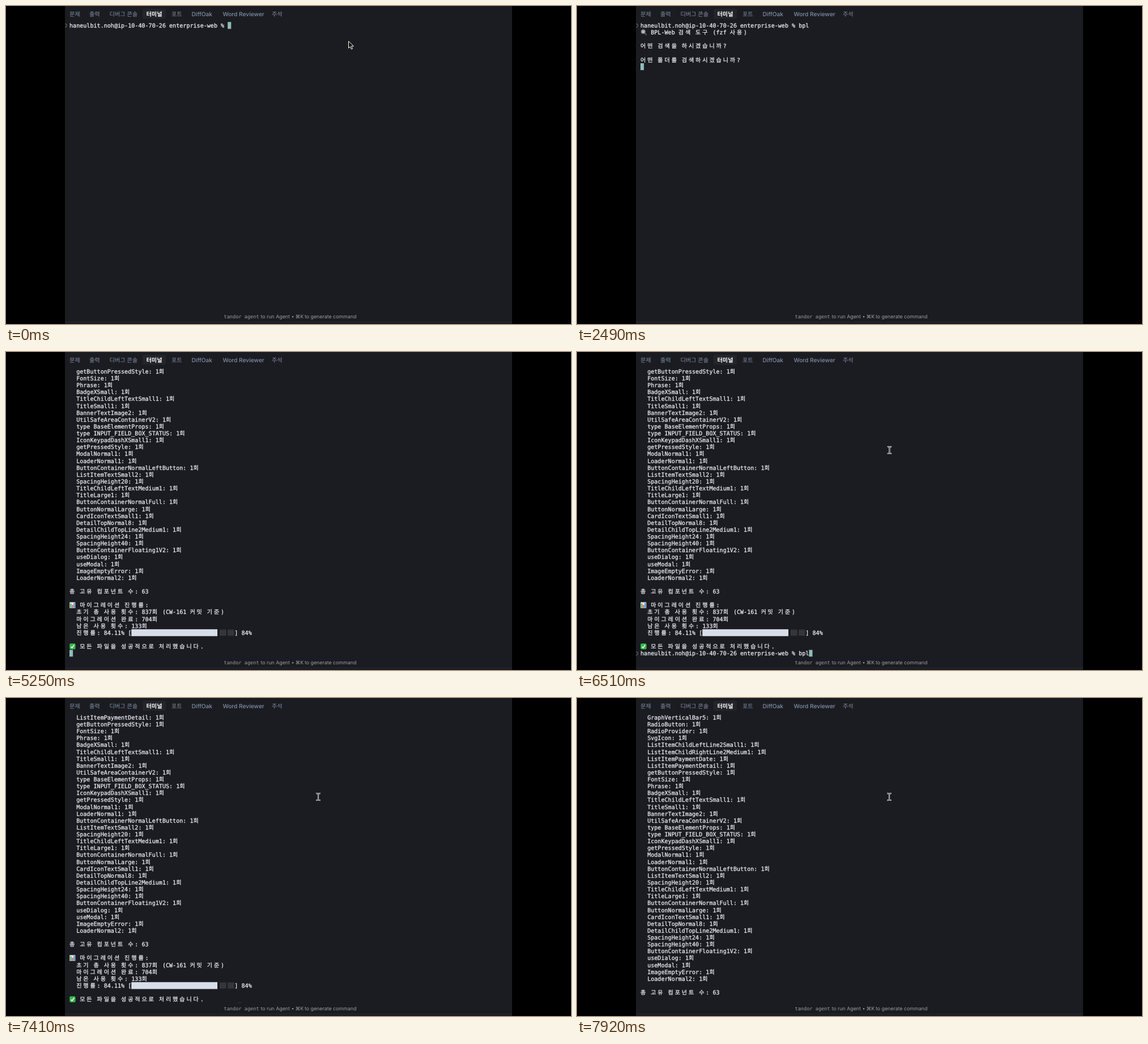
Recreate the animation shown at these times as an HTML page. Size 997x561 px, loop 8000 ms.

```html
<!DOCTYPE html>
<html lang="ko">
<head>
<meta charset="utf-8">
<title>터미널</title>
<style>
  html, body { margin: 0; width: 100%; height: 100%; overflow: hidden; background: #000; }
  svg { display: block; width: 997px; height: 561px; }
  text { white-space: pre; text-rendering: geometricPrecision; }
  .term text {
    font: 10.08px "DejaVu Sans Mono", "Noto Sans CJK KR", "Noto Sans CJK JP", monospace;
    color: #eef0f4; fill: currentColor; stroke: currentColor; stroke-width: .25px;
  }
  .tabs text { font: 500 10.2px Inter, "Noto Sans CJK KR", "Noto Sans CJK JP", sans-serif; fill: #8190a8; }
  .tabs .active { fill: #fff; font-weight: 600; }
  .hint text { font: 8.8px Inter, "DejaVu Sans", sans-serif; fill: #9b9ea4; }
  .hint .mono { font: 8.6px "DejaVu Sans Mono", monospace; }
</style>
</head>
<body>
<svg viewBox="0 0 997 561">
  <defs>
    <clipPath id="view"><rect x="104" y="28" width="789" height="509.5"/></clipPath>
    <pattern id="shade" width="3" height="3" patternUnits="userSpaceOnUse">
      <path d="M0 0h1v1h-1zM1.5 1.5h1v1h-1z" fill="#8b9099"/>
    </pattern>
  </defs>
  <rect width="997" height="561"/>
  <rect x="104" width="789" height="561" fill="#1b1c21"/>
  <rect x="104" y="557" width="789" height="1" fill="#292a30"/>
  <g class="tabs">
    <rect x="241" y="5" width="41" height="17.5" rx="3" fill="#24252b"/>
    <text x="112" y="17.6">문제</text>
    <text x="147" y="17.6">출력</text>
    <text x="182.5" y="17.6">디버그 콘솔</text>
    <text x="247.5" y="17.6" class="active">터미널</text>
    <text x="292" y="17.6">포트</text>
    <text x="327.5" y="17.6">DiffOak</text>
    <text x="382.5" y="17.6">Word Reviewer</text>
    <text x="469" y="17.6">주석</text>
  </g>
  <g class="term" clip-path="url(#view)"><g id="screen"></g></g>
  <g class="hint">
    <text x="384.5" y="551" class="mono">tandor agent</text>
    <text x="449.5" y="551">to run Agent</text>
    <circle cx="506" cy="548.2" r="1.2" fill="#9b9ea4"/>
    <text x="510.5" y="551">⌘K</text>
    <text x="527" y="551">to generate command</text>
  </g>
  <g id="pointers"></g>
</svg>
<script>
const LOOP = 8000, LEFT = 112, TOP = 28.2, CW = 6.07, RH = 12.13;
const screen = document.getElementById('screen');
const pointers = document.getElementById('pointers');
const colX = c => LEFT + c * CW;
const rowY = r => TOP + r * RH;

const icons = {
  '🔍': `<path d="M7 7l3.2 3.4" stroke="#55585f" stroke-width="2" stroke-linecap="round"/>
    <circle cx="4.8" cy="4.9" r="3.5" fill="#a9b6bd" stroke="#70757c" stroke-width="1.2"/>`,
  '📊': `<rect x=".3" y=".8" width="10" height="10.4" fill="#e9edf0"/>
    <path d="M1.3 3h2.2v8h-2.2z" fill="#4caf50"/><path d="M4.3 5.5h2.2v5.5h-2.2z" fill="#e2574c"/>
    <path d="M7.3 1.8h2.2v9.2h-2.2z" fill="#3f86d8"/>`,
  '✅': `<rect x=".2" y=".8" width="10.4" height="10.4" rx="2" fill="#33b84a"/>
    <path d="M2.6 6.4l2 2.3 3.6-5.4" fill="none" stroke="#fff" stroke-width="1.5"/>`
};
const isWide = ch => icons[ch] || /[가-힣]/.test(ch);
const cols = s => [...s].reduce((n, ch) => n + (isWide(ch) ? 2 : 1), 0);

// Sets a string on the terminal grid; Hangul and icons take two cells.
function line(s, row, col = 0, color = '') {
  const xs = [];
  let text = '', extra = '';
  for (const ch of s) {
    xs.push(colX(col).toFixed(2));
    if (icons[ch]) extra += `<g transform="translate(${colX(col)} ${rowY(row)})">${icons[ch]}</g>`;
    text += icons[ch] ? ' ' : ch === '<' ? '&lt;' : ch;
    col += isWide(ch) ? 2 : 1;
  }
  const style = color && ` style="color:${color}"`;
  return `<text x="${xs.join(' ')}" y="${(rowY(row) + 9.7).toFixed(2)}"${style}>${text}</text>${extra}`;
}
const block = (row, c, n, fill) =>
  `<rect x="${colX(c)}" y="${rowY(row)}" width="${n * CW}" height="${RH}" fill="${fill}"/>`;

const PROMPT = 'haneulbit.noh@ip-10-40-70-26 enterprise-web % ';
const prompt = row => line(PROMPT, row) +
  `<circle cx="104.6" cy="${rowY(row) + 6.3}" r="2.9" fill="none" stroke="#74777e"/>`;

// Ten-row picker: prompt at the bottom, items growing upwards.
function menu(items, top, pick) {
  const last = top + 9;
  const count = `< ${items.length}/${items.length}`;
  const y = rowY(last) + RH / 2;
  return line('>', last, 0, '#87afd7') + line(count, last, 3, '#afaf87') +
    `<path d="M${colX(4 + cols(count))} ${y}H888" stroke="#4a4b50"/>` +
    items.map((item, i) => {
      const row = last - 1 - i, on = i === pick;
      return block(row, 0, on ? 2 + cols(item) : 1, '#303136') +
        (on ? line('>', row, 0, '#d73a6f') : '') + line(item, row, 2);
    }).join('');
}

const timed = [];
function show(from, to, html, parent = screen) {
  const g = document.createElementNS('http://www.w3.org/2000/svg', 'g');
  g.innerHTML = html;
  parent.append(g);
  timed.push({ g, from, to });
  return g;
}

const DONE = 5250;
const modes = ['BPL-Web 컴포넌트 사용 횟수 검색', '@banksalad/bpl-web import 검색 (마이그레이션 현황)'];
const folders = ['.', './apps', './configs', './docs', './packages', './scripts', './services', './tools'];

show(0, DONE, prompt(0));
[[660, 'b'], [870, 'p'], [1050, 'l']].forEach(([t, ch], i) => show(t, DONE, line(ch, 0, 46 + i)));
show(1350, DONE, line('🔍 BPL-Web 검색 도구 (fzf 사용)', 1) + line('어떤 검색을 하시겠습니까?', 3));
show(1500, 1890, menu(modes, 4, 0));
show(1890, 2130, menu(modes, 4, 1));
show(2130, DONE, line('어떤 폴더를 검색하시겠습니까?', 5));
[[2520, 0], [3000, 1], [3090, 2], [3180, 1], [3270, 0], [3540]].forEach(([t, pick], i, all) => {
  if (all[i + 1]) show(t, all[i + 1][0], menu(folders, 6, pick));
});
show(3540, DONE, line('. 폴더를 검색합니다...', 7) +
  line('@banksalad/bpl-web import를 전체 프로젝트에서 검색 중...', 8));

const names = `GraphVerticalBar5,RadioButton,RadioProvider,SvgIcon,ListItemChildLeftLine2Small1,
ListItemChildRightLine2Medium1,ListItemPaymentDate,ListItemPaymentDetail,getButtonPressedStyle,FontSize,
Phrase,BadgeXSmall,TitleChildLeftTextSmall1,TitleSmall1,BannerTextImage2,UtilSafeAreaContainerV2,
type BaseElementProps,type INPUT_FIELD_BOX_STATUS,IconKeypadDashXSmall1,getPressedStyle,ModalNormal1,
LoaderNormal1,ButtonContainerNormalLeftButton,ListItemTextSmall2,SpacingHeight20,TitleChildLeftTextMedium1,
TitleLarge1,ButtonContainerNormalFull,ButtonNormalLarge,CardIconTextSmall1,DetailTopNormal8,
DetailChildTopLine2Medium1,SpacingHeight24,SpacingHeight40,ButtonContainerFloating1V2,useDialog,useModal,
ImageEmptyError,LoaderNormal2`.split(/,\s*/);
const report = [
  ...names.map(n => `  ${n}: 1회`),
  '', '총 고유 컴포넌트 수: 63', '', '📊 마이그레이션 진행률:',
  '  초기 총 사용 횟수: 837회 (CW-161 커밋 기준)', '  마이그레이션 완료: 704회', '  남은 사용 횟수: 133회',
  '  진행률: 84.11% [' + ' '.repeat(30) + '] 84%',
  '', '✅ 모든 파일을 성공적으로 처리했습니다.'
];
const HIDDEN = 8, BAR = 38;
show(DONE, LOOP, report.map((s, i) => s && line(s, i - HIDDEN)).join('') +
  block(BAR, 18, 25, '#d8dee9') +
  [377, 391].map(x => `<rect x="${x}" y="${rowY(BAR) + 0.5}" width="11.5" height="11" fill="url(#shade)"/>`).join(''));
show(5310, LOOP, prompt(41));
show(5820, LOOP, line('bpl', 41, 46));

const caret = show(0, LOOP, block(0, 0, 1, '#8fbcbb'));
show(0, 660, `<path d="M604.5 62v12.4l2.9-2.7 2 4.5 2.1-.9-2-4.4h3.9z" fill="#111" stroke="#fff"/>`, pointers);
const bar = 'M-2.8-6Q-.5-6 0-4.6Q.5-6 2.8-6M0-4.6V4.6M-2.8 6Q-.5 6 0 4.6Q.5 6 2.8 6';
const beam = show(6270, LOOP, `<g fill="none" stroke-linecap="round"><path d="${bar}" stroke="#fff" stroke-width="2.2"/>
  <path d="${bar}" stroke="#15161a" stroke-width=".8"/></g>`, pointers);

// [time, row, column]
const caretSteps = [[0, 0, 46], [660, 0, 47], [870, 0, 48], [1050, 0, 49], [1290, 1, 0], [1350, 4, 0],
  [1500, 13, 2], [2130, 6, 0], [2520, 15, 2], [3540, 9, 0], [DONE, 41, 0], [5310, 41, 46], [5820, 41, 49]];
// [time, rows scrolled back]
const scrollSteps = [[0, 0], [6720, 1], [6780, 2], [6840, 3], [7080, 2], [7140, 1], [7200, 0], [7410, 1],
  [7440, 2], [7500, 3], [7560, 4], [7620, 5], [7680, 6], [7890, 7], [7920, 8]];
const stepAt = (steps, t) => steps.findLast(s => s[0] <= t);
const move = (el, x, y) => el.setAttribute('transform', `translate(${x} ${y})`);

function draw(t) {
  for (const { g, from, to } of timed) g.style.display = t >= from && t < to ? '' : 'none';
  const [, row, col] = stepAt(caretSteps, t);
  move(caret, col * CW, row * RH);
  move(screen, 0, stepAt(scrollSteps, t)[1] * RH);
  const p = Math.min(1, Math.max(0, (Math.floor(t / 30) * 30 - 6270) / 270));
  const e = 1 - (1 - p) ** 2;
  move(beam, 585.5 - 34.5 * e, 72 + 102.3 * e);
}

const start = performance.now();
function tick() {
  draw((performance.now() - start) % LOOP);
  requestAnimationFrame(tick);
}
tick();
</script>
</body>
</html>
```
